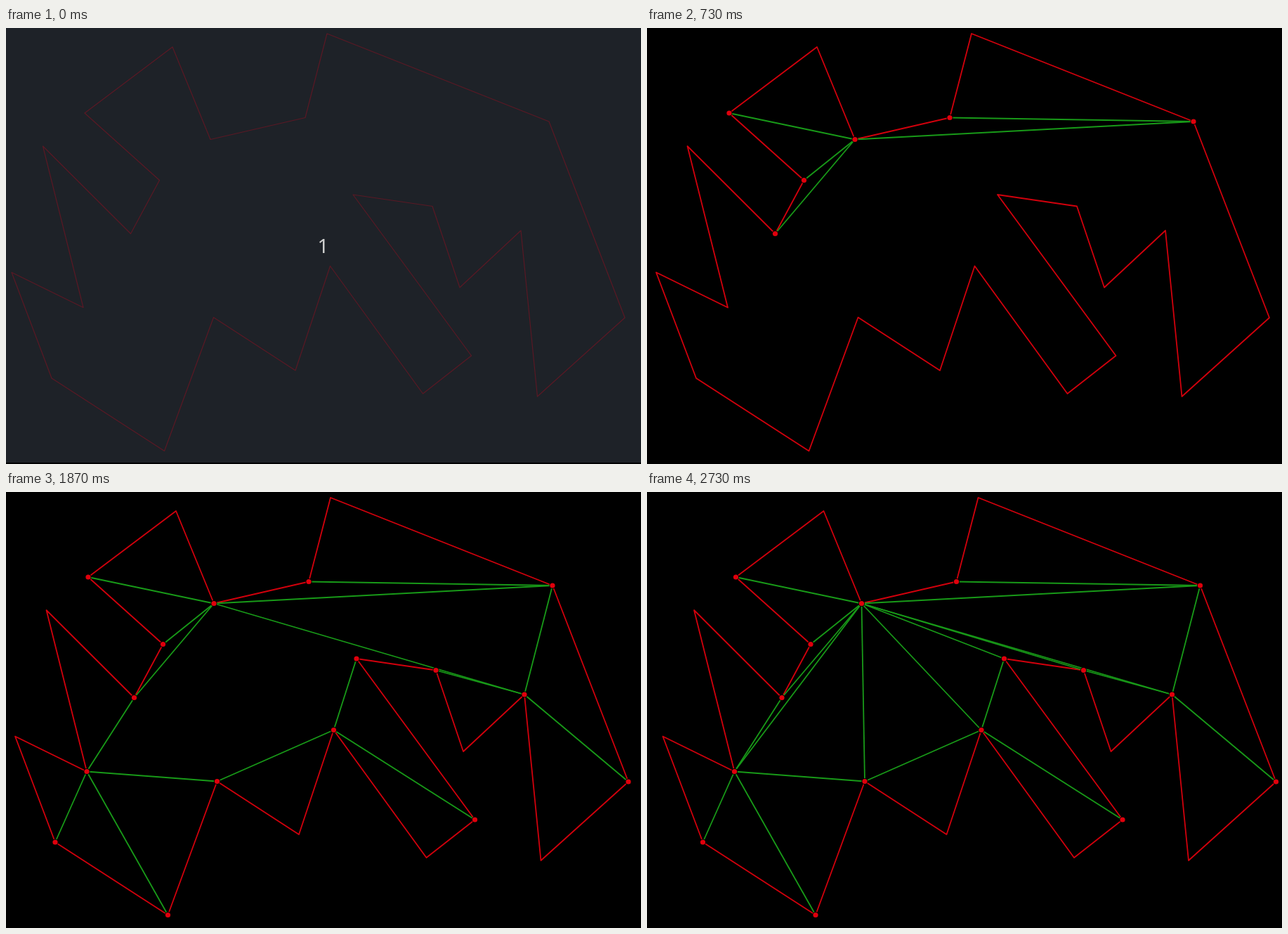
Write an HTML page with a canvas that moves like this. It is 904x620 px and loops after 2940 ms.

```html
<!DOCTYPE html>
<html lang="en">
<head>
<meta charset="utf-8">
<title>Polygon triangulation</title>
<style>
  html, body { margin: 0; width: 100%; height: 100%; overflow: hidden; background: #000; }
  canvas { display: block; }
</style>
</head>
<body>
<canvas id="stage" width="904" height="620"></canvas>
<script>
const ctx = document.getElementById('stage').getContext('2d');
const LOOP = 2940;

// Polygon corners, clockwise
const corners = {
  A: [237, 27], B: [291, 158.5], C: [426, 127.5], D: [457, 8],
  E: [773, 133], F: [881, 412], G: [756.5, 524], H: [733, 288],
  I: [646, 369], J: [607, 253.5], K: [494, 237], L: [662.5, 466],
  M: [593.5, 520], N: [461.5, 338.5], O: [412, 487], P: [295.5, 411.5],
  Q: [225.5, 601.5], R: [65, 498], S: [8, 347.5], T: [110, 397.5],
  U: [52.5, 168], V: [177.5, 292.5], W: [218.5, 216.5], X: [112, 121]
};

// Diagonals in the order they are cut
const cuts = [
  [330, 'CE'], [470, 'BE'], [530, 'BX'], [530, 'BW'], [730, 'BV'],
  [800, 'VT'], [930, 'TR'], [1070, 'TQ'], [1130, 'TP'], [1270, 'PN'],
  [1330, 'NL'], [1470, 'NK'], [1530, 'JH'], [1670, 'HF'], [1730, 'HE'],
  [1870, 'BH'], [1930, 'BT'], [2070, 'BP'], [2130, 'BN'], [2270, 'BK'],
  [2400, 'BJ']
];

function outline(color, width) {
  ctx.strokeStyle = color;
  ctx.lineWidth = width;
  ctx.beginPath();
  for (const p of Object.values(corners)) ctx.lineTo(...p);
  ctx.closePath();
  ctx.stroke();
}

function disc(p, r, color) {
  ctx.fillStyle = color;
  ctx.beginPath();
  ctx.arc(p[0], p[1], r, 0, 2 * Math.PI);
  ctx.fill();
}

function title() {
  ctx.fillStyle = '#1e2228';
  ctx.fillRect(0, 0, 904, 618);
  outline('#5a1824', 1.2);
  ctx.fillStyle = '#d0d0d0';
  ctx.font = '28px "Noto Sans", "Open Sans", sans-serif';
  ctx.textAlign = 'center';
  ctx.fillText('1', 451.5, 320);
}

function triangulation(t) {
  const shown = cuts.filter(([start]) => t >= start).map(cut => cut[1]);
  ctx.save();
  ctx.translate(t < 270 ? 0 : t < 2730 ? 5 : 14.5, 0);
  outline('#d2000c', 1.8);

  ctx.strokeStyle = '#189a18';
  ctx.lineWidth = 1.8;
  for (const [a, b] of shown) {
    ctx.beginPath();
    ctx.moveTo(...corners[a]);
    ctx.lineTo(...corners[b]);
    ctx.stroke();
  }

  for (const name of new Set(shown.join(''))) {
    disc(corners[name], 4.5, '#000');
    disc(corners[name], 3.6, '#e0000c');
  }
  ctx.restore();
}

function draw(t) {
  ctx.fillStyle = '#000';
  ctx.fillRect(0, 0, 904, 620);
  if (t < 200) title();
  else triangulation(t);
}

const begin = performance.now();
function tick() {
  draw((performance.now() - begin) % LOOP);
  requestAnimationFrame(tick);
}
ctx.lineJoin = 'round';
tick();
</script>
</body>
</html>
```
